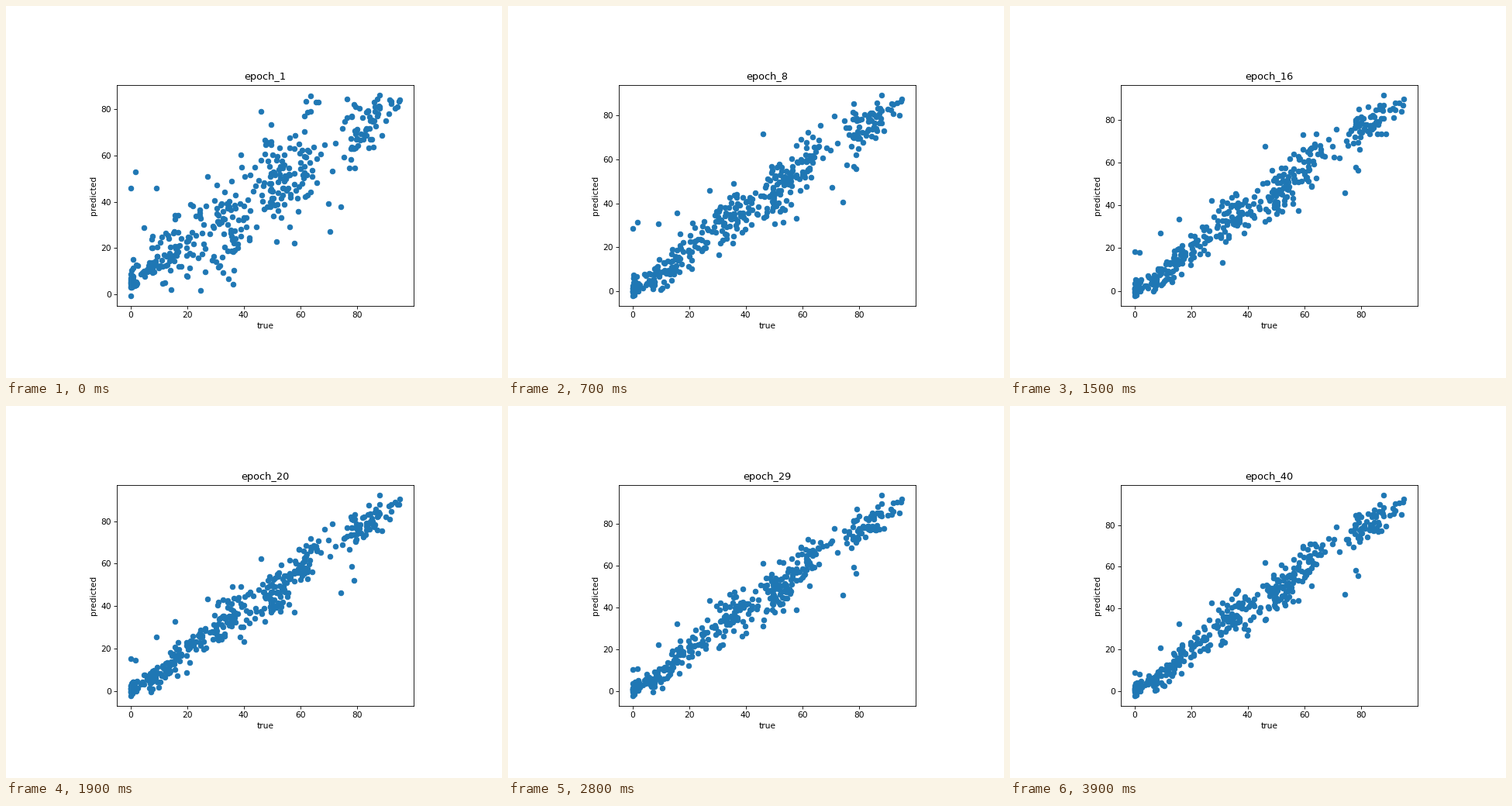
These frames come from a looping animation (640x480 px, 4 s). A matplotlib script:

```python
import numpy as np
import matplotlib.pyplot as plt
from matplotlib.animation import FuncAnimation

EPOCHS = 40
K = 0.77  # plot scale inside the stage
rng = np.random.default_rng(8)

plt.rcParams.update({
    "font.family": "DejaVu Sans",
    "font.size": 10 * K,
    "axes.titlesize": 12 * K,
    "axes.titlepad": 6 * K,
    "axes.labelpad": 4 * K,
    "axes.linewidth": 0.8 * K,
    **{f"{a}tick.major.{name}": value * K
       for a in "xy"
       for name, value in (("size", 3.5), ("pad", 3.5), ("width", 0.8))},
})


def true_values():
    """Many small values, an even spread, and a few clusters."""
    clusters = [rng.normal(c, 2, 19) for c in (14, 36, 52, 62, 79, 86)]
    return np.concatenate([
        rng.exponential(1.2, 52),
        rng.uniform(4, 66, 205),
        rng.uniform(66, 95, 32),
        *clusters,
    ])


def first_guess(x):
    """Wide, slightly bent cloud of the untrained model."""
    bend = 4 * np.sin(2 * np.pi * (x - 48) / 50) * np.sin(np.pi * x / 95)
    spread = 2.3 + 10.5 * np.sin(np.pi * x / 100)
    tail = rng.exponential(1.3, x.size) - 0.8
    error = np.where(x < 10, tail, rng.normal(size=x.size))
    return 4.5 + 0.85 * x + bend + spread * error


def last_guess(x):
    """Narrow band along the diagonal."""
    wave = -2 * np.sin(np.pi * x / 20)
    error = np.clip(rng.normal(size=x.size), -2.2, 2.2)
    return 0.5 + 0.98 * x + wave + band(x) * error


def band(x):
    return 1.7 + 3.3 * np.sin(np.pi * x / 100)


# Stubborn points: true value, first and last prediction.
OUTLIERS = np.array([
    (0.1, 46, 7), (1.8, 53, 6), (9, 46, 19), (15.7, 34, 33),
    (27.1, 51, 43), (46.1, 79, 60), (57.8, 22, 44), (70.6, 27, 76),
    (74.2, 38, 48), (78, 63, 58), (79, 63, 55),
])

bulk = true_values()
count = bulk.size
x = np.append(bulk, OUTLIERS[:, 0])
start = np.append(first_guess(bulk), OUTLIERS[:, 1])
end = np.append(last_guess(bulk), OUTLIERS[:, 2])
pace = np.where(np.arange(x.size) < count, 3, 12)  # epochs to settle
inset = rng.uniform(0, 4, x.size)


def predict(epoch):
    """Return limits and all points for one epoch."""
    age = epoch - 1
    low = -2.2 + 1.6 * np.exp(-age / 4)
    high = 95.7 - 9.5 * np.exp(-age / 18)

    w = np.exp(-age / pace)
    noise = 1.5 * np.exp(-epoch / 20) * band(x) * rng.normal(size=x.size)
    y = w * start + (1 - w) * (end * high / 95 + noise)
    y = np.clip(y, low + inset, high - inset)
    points = np.column_stack([
        np.append(x, [0, 88, 95.2]),
        np.append(y, [low, high, high - 2]),
    ])
    return low, high, points


history = [predict(e) for e in range(1, EPOCHS + 1)]

fig = plt.figure(figsize=(6.4, 4.8), dpi=100, facecolor="white")
ax = fig.add_axes([143.3 / 640, 93.3 / 480, 382.4 / 640, 285 / 480])
ax.set_xlim(-4.76, 99.96)
ax.set_xticks(range(0, 81, 20))
ax.set_yticks(range(0, 81, 20))
ax.set_xlabel("true")
ax.set_ylabel("predicted")
title = ax.set_title("epoch_1")
dots = ax.scatter([], [], s=36 * K**2, linewidths=K, color="#1f77b4")


def update(frame):
    low, high, points = history[frame]
    margin = 0.05 * (high - low)
    ax.set_ylim(low - margin, high + margin)
    dots.set_offsets(points)
    title.set_text(f"epoch_{frame + 1}")
    return dots, title


anim = FuncAnimation(fig, update, frames=EPOCHS, interval=100,
                     repeat=True, repeat_delay=0, blit=False)
plt.show()
```
